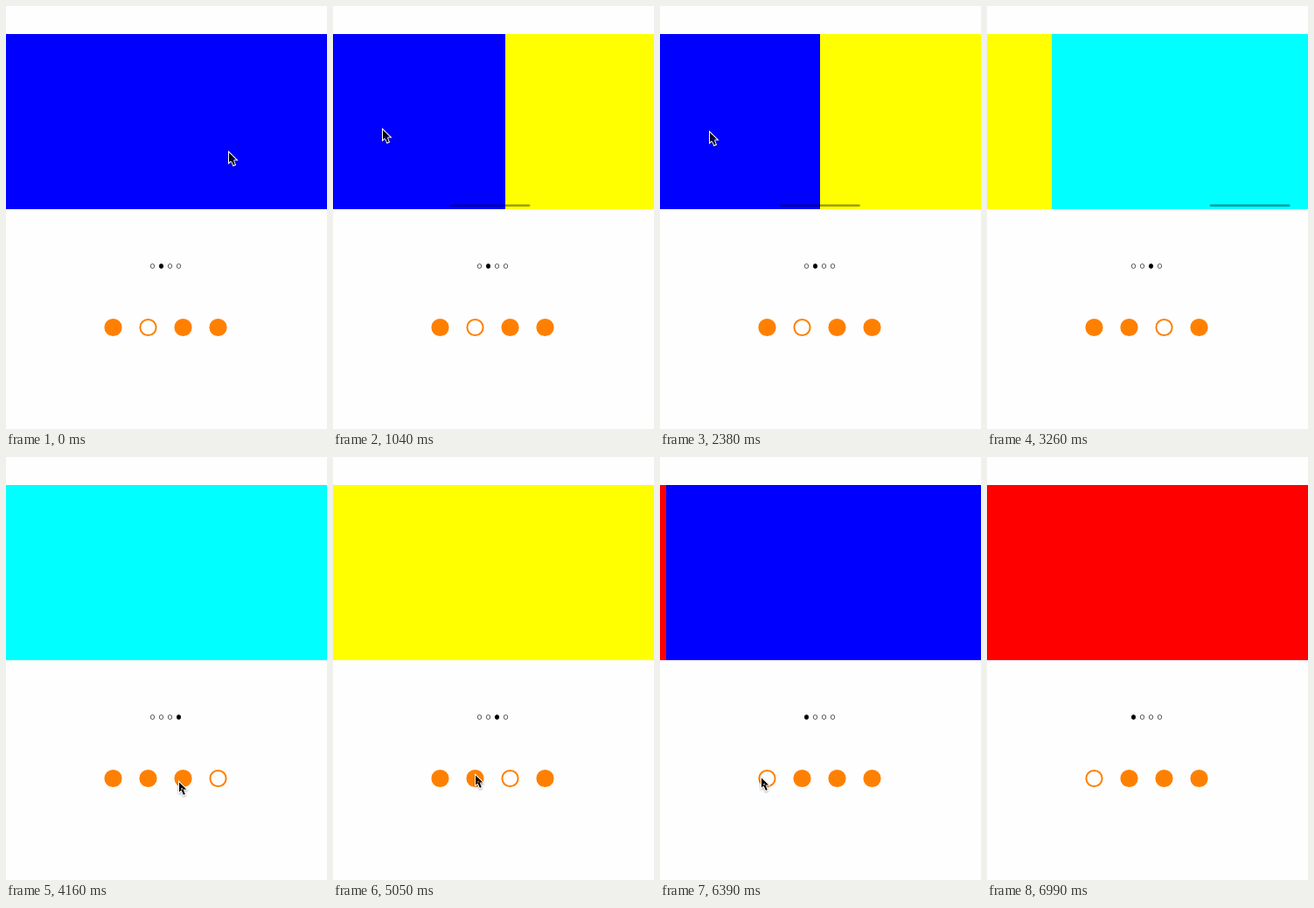
Recreate the animation shown at these times as an HTML page. Size 367x483 px, loop 8870 ms.

```html
<!DOCTYPE html>
<html lang="en">
<head>
<meta charset="utf-8">
<title>Pager</title>
<style>
html, body { margin: 0; width: 100%; height: 100%; overflow: hidden; background: #fefefe; }
svg { display: block; width: 367px; height: 483px; }
.small { fill: #fefefe; stroke: #333; stroke-width: .8; }
.small.on { fill: #000; stroke: #000; }
.big { fill: #ff8000; stroke: #ff8000; stroke-width: 2; }
.big.on { fill: #fefefe; }
#cursor { filter: drop-shadow(0 1px 1px rgba(0, 0, 0, .35)); }
</style>
</head>
<body>
<svg viewBox="0 0 367 483">
  <clipPath id="view"><rect y="32" width="367" height="200"/></clipPath>
  <g clip-path="url(#view)">
    <g id="pages"></g>
    <rect id="bar" y="226.5" width="92" height="2.5" rx="1.25" opacity=".38"/>
  </g>
  <g id="dots"></g>
  <g id="cursor">
    <path fill="#fff" d="M0 0V16L4.4 11.7L4.8 11.6H11.6ZM9.1 16.7L5.5 18.2L.8 7.1L4.5 5.6Z"/>
    <path d="M1 2.4V13.6L4 10.7L4.4 10.6H9.2ZM2.8 9.4L4.7 8.6L7.8 16L5.9 16.8Z"/>
  </g>
</svg>
<script>
const LOOP = 8870, WIDTH = 367, HOLD = 730, STEP = 148.6, LAST = 42;
const COLORS = ['#f00', '#00f', '#ff0', '#0ff'];
const $ = id => document.getElementById(id);

function add(parent, tag, attrs) {
  const el = document.createElementNS('http://www.w3.org/2000/svg', tag);
  for (const name in attrs) el.setAttribute(name, attrs[name]);
  return parent.appendChild(el);
}

// Times are counted in screen refreshes; -1 is the opening pose.
const swipe = (start, end, to) => ({ start, end, to, settle: end, drag: true });
const tap = (at, to) => ({ start: at - .2, end: at + 2.2, to, settle: at });
const move = (start, end, x, y) => ({ start, end, x, y });

const scrolls = [
  swipe(-1, 2, 1.463), swipe(2, 6, 1), swipe(8, 14, 2), swipe(14.5, 18.01, 3),
  tap(26, 2), tap(32, 1), tap(38, 0)
];
const moves = [
  move(-1, 2, 56, 139), move(2, 5, 200, 219), move(5, 8, 283, 169),
  move(9, 11, 56, 142), move(11, 14, 270, 170), move(14, 17, -30, 150),
  move(18, 23, 197, 369), move(26, 29, 162, 361), move(34, 37, 115, 364),
  move(39, 42, 200, 500)
];

function ease(t) {
  t = Math.min(1, Math.max(0, t));
  return t * t * (3 - 2 * t);
}

const follow = (legs, key, from, k) => legs.reduce(
  (v, leg) => v + (leg[key] - v) * ease((k - leg.start) / (leg.end - leg.start)), from);

const dots = COLORS.map((fill, i) => {
  add($('pages'), 'rect', { x: i * WIDTH, y: 32, width: WIDTH, height: 200, fill });
  return [
    add($('dots'), 'ellipse', { class: 'small', cx: 167.5 + 10 * i, cy: 297, rx: 2.2, ry: 2.5 }),
    add($('dots'), 'circle', { class: 'big', cx: 122.5 + 40 * i, cy: 367, r: 9.1 })
  ];
});

function draw(k) {
  const pos = follow(scrolls, 'to', 1, k);
  const page = scrolls.reduce((p, leg) => k >= leg.settle ? Math.round(leg.to) : p, 1);
  const dragging = scrolls.some(leg => leg.drag && k > leg.start && k <= leg.end);
  const x = Math.round(follow(moves, 'x', 254, k));
  const y = Math.round(follow(moves, 'y', 165, k));
  $('pages').setAttribute('transform', `translate(${-Math.round(pos * WIDTH)} 0)`);
  $('bar').setAttribute('x', .8 + 272 * pos / 3);
  $('bar').setAttribute('visibility', dragging ? 'visible' : 'hidden');
  $('cursor').setAttribute('transform', `translate(${x} ${y})`);
  dots.forEach((pair, i) => pair.forEach(el => el.classList.toggle('on', i === page)));
}

let shown;
const origin = performance.now();
function tick(now) {
  const t = Math.max(0, now - origin) % LOOP;
  const k = Math.min(LAST, Math.max(-1, Math.floor((t - HOLD) / STEP)));
  if (k !== shown) draw(shown = k);
  requestAnimationFrame(tick);
}
tick(origin);
</script>
</body>
</html>
```
